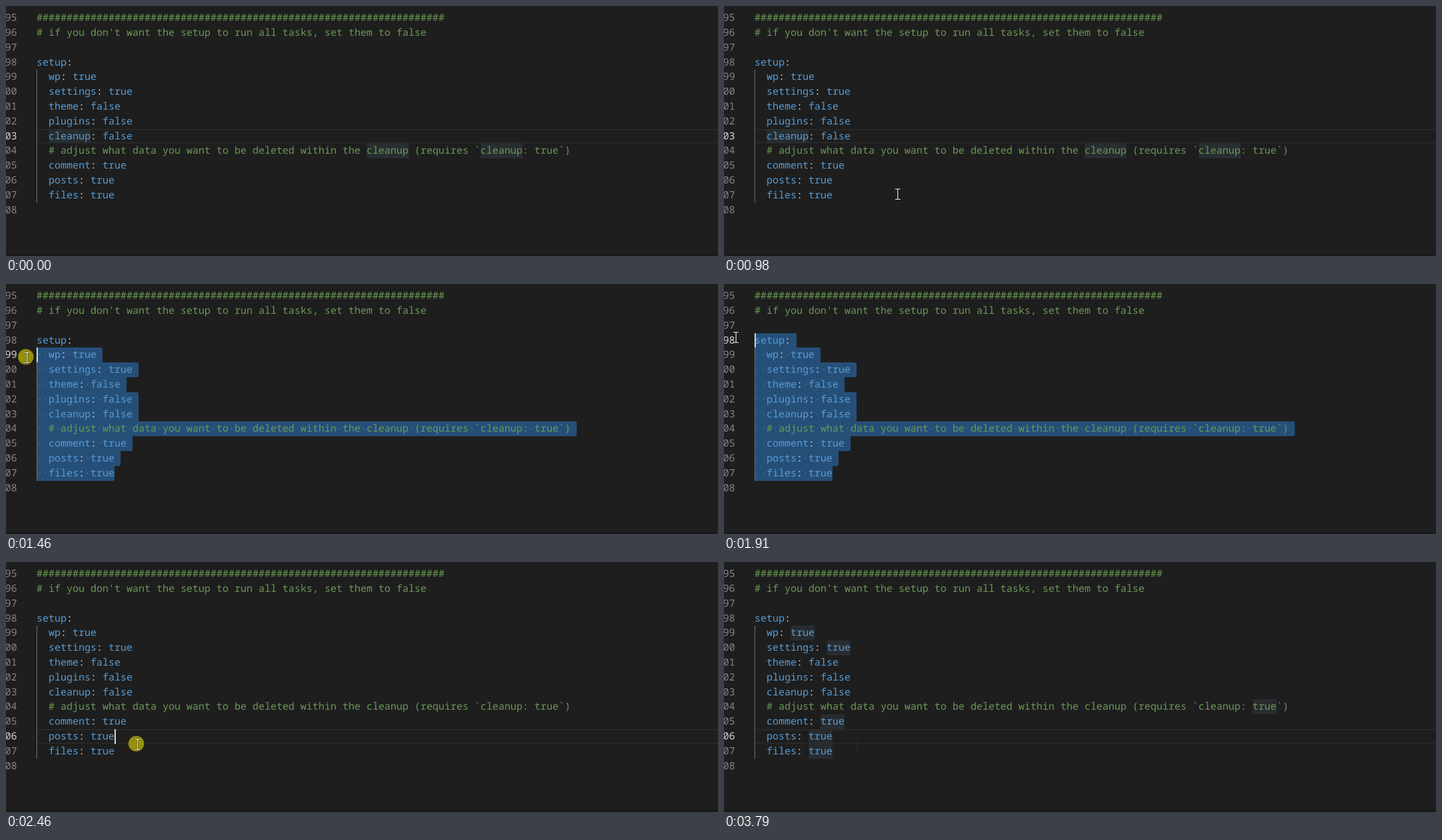
An HTML page for the animation above (3.87 s loop, 1096 by 386 pixels).

```html
<!DOCTYPE html>
<html lang="en">
<head>
<meta charset="utf-8">
<title>Editor selection</title>
<style>
  html, body { margin: 0; width: 100%; height: 100%; overflow: hidden; background: #1e1e1e; }
  svg { display: block; }
  text {
    font: 15.4px "Noto Sans Mono", "DejaVu Sans Mono", monospace;
    white-space: pre;
    text-rendering: geometricPrecision;
  }
  .comment { fill: #6a9955; }
  .word { fill: #569cd6; }
  .colon { fill: #d4d4d4; }
</style>
</head>
<body>
<svg id="stage" width="1096" height="386" viewBox="0 0 1096 386"></svg>
<script>
const LOOP = 3870, LEFT = 47, CHAR = 9.24, TOP = 7, PITCH = 22.8, BASE = 16;
const lines = [
  '#'.repeat(68),
  "# if you don't want the setup to run all tasks, set them to false",
  '',
  'setup:',
  '  wp: true',
  '  settings: true',
  '  theme: false',
  '  plugins: false',
  '  cleanup: false',
  '  # adjust what data you want to be deleted within the cleanup (requires `cleanup: true`)',
  '  comment: true',
  '  posts: true',
  '  files: true',
  ''
];
const anchor = { row: 12, col: 13 };

// Each entry holds from its time until the next one.
const pointerKeys = [
  [0, null],
  [570, 1007, 377], [650, 850, 330], [730, 640, 278], [810, 440, 256],
  [890, 312, 270], [980, 267, 290], [1050, 265, 293],
  [1120, 265, 295, true], [1190, 252, 284, true], [1260, 192, 244, true],
  [1330, 116, 190, true], [1400, 58, 138, true], [1460, 32, 113, true],
  [1520, 23, 95, true], [1580, 19, 85, true], [1640, 18, 81, true],
  [1910, 18, 82], [1980, 32, 98], [2050, 72, 146], [2120, 134, 212],
  [2190, 184, 264], [2260, 202, 281],
  [2460, 202, 281, true], [2520, 202, 281],
  [2660, 203, 288], [2750, 205, 303], [2840, 207, 320], [2930, null]
];
// time, active row, column, is selecting
const caretKeys = [
  [0, 8, 16, false], [1120, 12, 13, false], [1260, 11, 13, true],
  [1330, 10, 15, true], [1400, 7, 7, true], [1460, 4, 0, true],
  [1520, 3, 0, true], [2460, 11, 13, false]
];
const blinkKeys = [[0, false], [1120, true], [2050, false], [2460, true], [2930, false], [3470, true], [3790, false]];
const wordKeys = [[0, 'cleanup', '#282d30'], [1120, null], [2750, 'true', '#333a40'], [3790, 'true', '#282b2f']];
const TRACE_START = 2930;

const at = (keys, t) => keys.findLast(key => key[0] <= t).slice(1);
const colX = col => LEFT + col * CHAR;
// Rows snap to whole pixels.
const rowY = row => TOP + Math.floor(row * PITCH + .7);
const rowHeight = row => rowY(row + 1) - rowY(row);

function make(parent, tag, attrs = {}, content = '') {
  const node = document.createElementNS('http://www.w3.org/2000/svg', tag);
  for (const name in attrs) node.setAttribute(name, attrs[name]);
  node.textContent = content;
  parent.append(node);
  return node;
}

const stage = document.getElementById('stage');
make(stage, 'rect', { width: 1096, height: 386, fill: '#1e1e1e' });
make(stage, 'rect', { y: 383, width: 1096, height: 3, fill: '#191919' });
const back = make(stage, 'g');
make(stage, 'rect', { x: LEFT, y: rowY(4), width: 1, height: rowY(13) - rowY(4), fill: '#707070' });

function drawLine(line, row) {
  const y = rowY(row) + BASE;
  const code = line.trimStart();
  const text = make(stage, 'text', { x: colX(line.length - code.length), y });
  const parts = code.startsWith('#') ? [code] : code.match(/\w+|:\s*/g) || [];
  for (const part of parts) {
    const kind = part[0] === '#' ? 'comment' : part[0] === ':' ? 'colon' : 'word';
    make(text, 'tspan', { class: kind }, part);
  }
  return make(stage, 'text', { x: 17, y, 'text-anchor': 'end' }, 95 + row);
}
const numbers = lines.map(drawLine);

const caret = make(stage, 'rect', { width: 2, fill: '#d8d8d4' });
const beamPath = 'M-4-8H-1L0-7L1-8H4M0-7V7M-4 8H-1L0 7L1 8H4';
const trace = make(stage, 'path', {
  d: beamPath, transform: 'translate(204.5 281.5)', fill: 'none', stroke: '#2c2c2c'
});
const pointer = make(stage, 'g');
const press = make(pointer, 'circle', { cx: -2, cy: -1, r: 12, fill: '#e6dc00', 'fill-opacity': .6 });
make(pointer, 'path', { d: beamPath, fill: 'none', stroke: '#141414', 'stroke-width': 3, 'stroke-opacity': .4 });
make(pointer, 'path', { d: beamPath, fill: 'none', stroke: '#f0f0f0', 'stroke-width': 1.1 });

function drawSelection(startRow, startCol) {
  const endCol = row => row === anchor.row ? anchor.col : lines[row].length + 1;
  const rounding = (row, other) =>
    other < startRow || other > anchor.row || endCol(row) > endCol(other) ? 3 : 0;
  for (let row = startRow; row <= anchor.row; row++) {
    const from = row === startRow ? startCol : 0;
    const x = colX(from), y = rowY(row), right = colX(endCol(row)), bottom = rowY(row + 1);
    const a = rounding(row, row - 1), b = rounding(row, row + 1);
    make(back, 'path', {
      fill: '#264f78',
      d: `M${x} ${y}H${right - a}q${a} 0 ${a} ${a}V${bottom - b}q0 ${b} ${-b} ${b}H${x}z`
    });
    for (let col = from; col < lines[row].length; col++) {
      if (lines[row][col] === ' ')
        make(back, 'circle', { cx: colX(col + .5), cy: y + BASE - 5, r: 1.1, fill: '#4a6d8f' });
    }
  }
}

function drawWordMarks(word, fill) {
  lines.forEach((line, row) => {
    for (const match of line.matchAll(new RegExp(`\\b${word}\\b`, 'g')))
      make(back, 'rect', {
        x: colX(match.index), y: rowY(row), width: word.length * CHAR, height: rowHeight(row), fill
      });
  });
}

function render(t) {
  const [x, y, pressed] = at(pointerKeys, t);
  const [row, col, selecting] = at(caretKeys, t);
  const [word, wordFill] = at(wordKeys, t);
  back.replaceChildren();

  if (selecting) {
    drawSelection(row, col);
  } else {
    for (const edge of [rowY(row), rowY(row + 1) - 2])
      make(back, 'rect', { x: LEFT, y: edge, width: 1096 - LEFT, height: 2, fill: '#282828' });
  }
  if (word) drawWordMarks(word, wordFill);

  numbers.forEach((number, i) => number.setAttribute('fill', i === row ? '#d6d6d6' : '#858585'));
  caret.setAttribute('x', Math.round(colX(col)));
  caret.setAttribute('y', rowY(row));
  caret.setAttribute('height', rowHeight(row));
  caret.setAttribute('visibility', at(blinkKeys, t)[0] ? 'visible' : 'hidden');

  trace.setAttribute('visibility', t >= TRACE_START ? 'visible' : 'hidden');
  pointer.setAttribute('display', x === null ? 'none' : 'inline');
  if (x !== null) pointer.setAttribute('transform', `translate(${x + .5} ${y + .5})`);
  press.setAttribute('display', pressed ? 'inline' : 'none');
}

const start = performance.now();
function tick() {
  render((performance.now() - start) % LOOP);
  requestAnimationFrame(tick);
}
tick();
</script>
</body>
</html>
```
